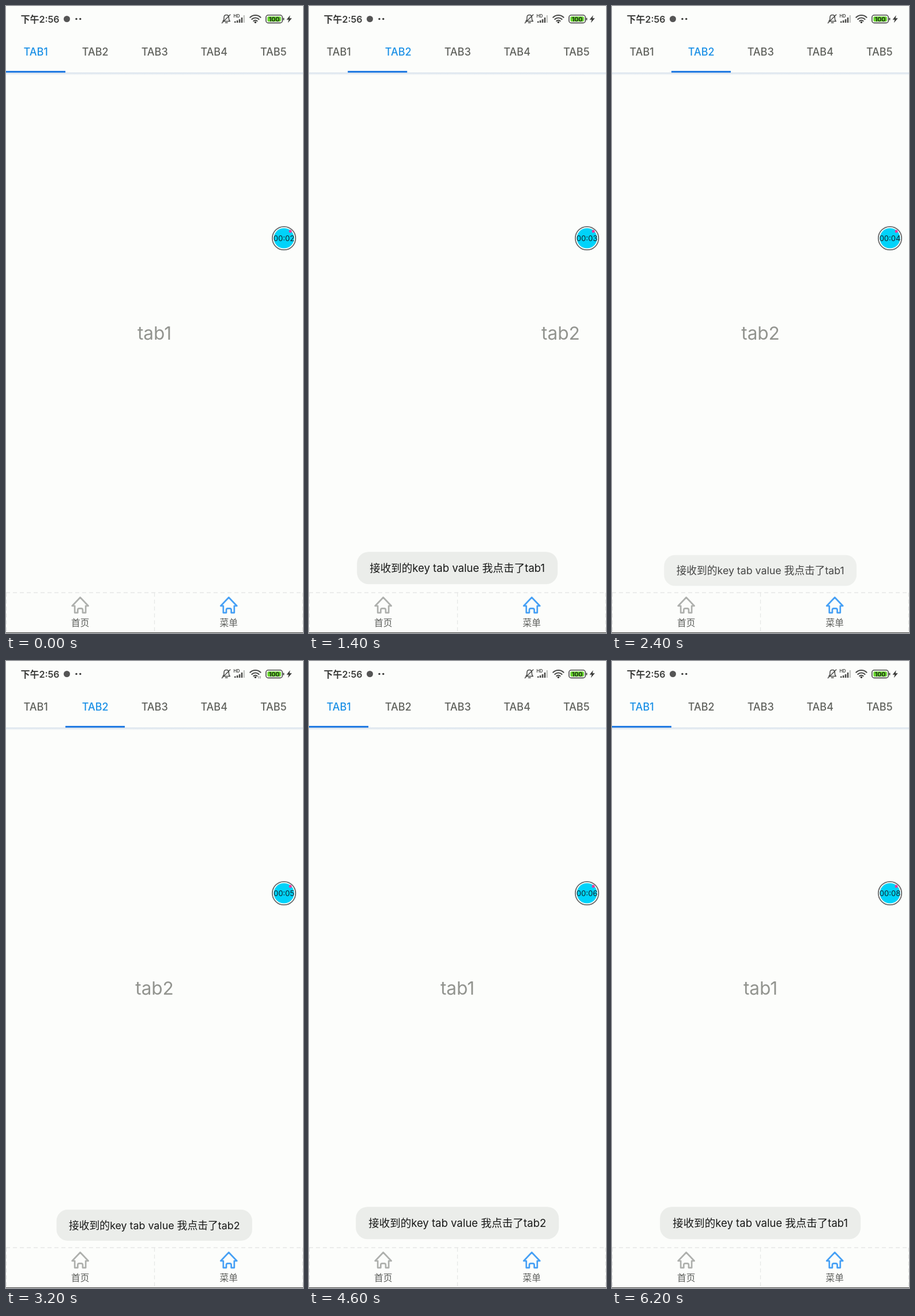
An HTML page for the animation above (6.3 s loop, 515 px wide and 1088 px high).

```html
<!DOCTYPE html>
<html lang="zh">
<head>
<meta charset="utf-8">
<title>Tabs</title>
<style>
  html, body { margin: 0; width: 100%; height: 100%; overflow: hidden; background: #fcfdfb; }
  svg { display: block; width: 100vw; height: 100vh; }
  text { font-family: Inter, "Noto Sans CJK SC", "Noto Sans CJK", sans-serif; white-space: pre; }
  .mid { text-anchor: middle; }
  .line { fill: none; stroke-linecap: round; stroke-linejoin: round; }
</style>
</head>
<body>
<svg viewBox="0 0 515 1088" preserveAspectRatio="none">
  <defs>
    <linearGradient id="shade" x1="0" y1="0" x2="0" y2="1">
      <stop offset="0" stop-color="#d3deea"/>
      <stop offset="1" stop-color="#fcfdfb"/>
    </linearGradient>
    <path id="house" class="line" stroke-width="2.7" d="M-9.5 1041H-14L0 1026.2L14 1041H9.5V1052.8H4.3V1048q0-2.6-2.6-2.6h-3.4q-2.6 0-2.6 2.6V1052.8H-9.5Z"/>
  </defs>
  <rect width="515" height="1088" fill="#fcfdfb"/>

  <!-- status bar -->
  <g fill="#3a3b39">
    <text x="25.5" y="28.5" font-size="16" font-weight="600">下午2:56</text>
    <circle cx="105.5" cy="22.5" r="5.5" fill="#555"/>
    <circle cx="122" cy="22.5" r="1.7"/>
    <circle cx="128.8" cy="22.5" r="1.7"/>
    <path class="line" stroke="#4a4b49" stroke-width="1.5" d="M376 26.5q2-2 2-4.5v-2q0-4.500 4.200-4.500t4.200 4.500v2q0 2.500 2 4.500ZM380.500 29h3.500M374.500 29.500L388.800 15"/>
    <text x="394.5" y="19.800" font-size="7.500" font-weight="600">HD</text>
    <g id="bars"></g>
    <g class="line" stroke="#4a4b49" stroke-width="2.200">
      <path d="M423.300 19.700a13 13 0 0 1 18.200 0M426.300 23a8.700 8.700 0 0 1 12.200 0M429.300 26a4.500 4.500 0 0 1 6.200 0"/>
    </g>
    <circle cx="432.400" cy="28.300" r="1.700"/>
    <path id="traffic" class="line" stroke="#777" stroke-width="1" d="M438.200 30v-3.500M441 26.500v3.500"/>
    <rect x="450.800" y="15.800" width="28.400" height="13.600" rx="4" fill="none" stroke="#4a4b49" stroke-width="1.600"/>
    <rect x="453.300" y="18.300" width="23.400" height="8.600" rx="2" fill="#66d52c"/>
    <rect x="480.500" y="20.500" width="1.800" height="4.200" rx=".8"/>
    <text class="mid" x="465" y="26.500" font-size="10.500" font-weight="700" fill="#20301a">100</text>
    <path d="M492.700 16L486.500 23.700H490.300L488.800 29.200L495.700 21.300H491.600Z"/>
  </g>

  <!-- tab strip -->
  <rect y="115.500" width="515" height="4.500" fill="url(#shade)"/>
  <g id="tabs" class="mid" font-size="18" font-weight="500"></g>
  <rect id="marker" y="112.700" width="103" height="2.800" fill="#0d6fe0"/>

  <!-- pages -->
  <g id="pages" class="mid" font-size="31.500" fill="#92948f">
    <text x="257.500" y="579">tab1</text>
    <text x="772.500" y="579">tab2</text>
  </g>

  <!-- recorder bubble -->
  <circle cx="482" cy="403" r="20.200" fill="#fff" stroke="#686a6a" stroke-width="1.800"/>
  <circle cx="482" cy="403" r="17.600" fill="#00d3fa"/>
  <circle cx="493" cy="391" r="2.500" fill="#e63b9b"/>
  <text id="clock" class="mid" x="482" y="407.800" font-size="13" fill="#10252b"></text>

  <!-- bottom bar -->
  <path d="M0 1018H515M.5 1018V1087M257.500 1018V1087M514.500 1018V1087" fill="none" stroke="#e6e7e6" stroke-width="1.300" stroke-dasharray="7 5"/>
  <use href="#house" x="128.700" stroke="#aeb0ad"/>
  <use href="#house" x="386.300" stroke="#46a0f5"/>
  <g class="mid" font-size="15.700" fill="#5d5f5c">
    <text x="128.700" y="1076">首页</text>
    <text x="386.300" y="1076">菜单</text>
  </g>
  <rect y="1087" width="515" height="1" fill="#3c3d3c"/>

  <g id="toast">
    <rect id="pill" y="-28" height="56" rx="20" fill="#ebedea"/>
    <text id="message" class="mid" y="6.800" font-size="18.500" fill="#161716"></text>
  </g>
</svg>
<script>
  const LOOP = 6300;
  const PAGE = 515, TAB = 103;
  const $ = id => document.getElementById(id);
  const clamp = v => Math.max(0, Math.min(1, v));
  const between = (t, a, b) => t >= a && t < b;

  const toasts = [
    { tab: 1, width: 348, start: 400, end: 2350 },
    { tab: 2, width: 352, start: 3000, end: 4980 },
    { tab: 1, width: 348, start: 5650, end: LOOP }
  ];
  const ENTER = 350, LEAVE = 250;

  function add(parent, tag, attrs, label = '') {
    const el = document.createElementNS('http://www.w3.org/2000/svg', tag);
    for (const key in attrs) el.setAttribute(key, attrs[key]);
    el.textContent = label;
    return parent.appendChild(el);
  }

  const tabs = [0, 1, 2, 3, 4].map(i =>
    add($('tabs'), 'text', { x: 51.7 + i * TAB, y: 86.3 }, 'TAB' + (i + 1)));

  for (let i = 0; i < 5; i++) {
    const h = [2.5, 4, 6, 9, 13][i];
    add($('bars'), 'rect', {
      x: 396 + i * 3.9, y: 29 - h, width: 2.5, height: h, fill: i < 4 ? '#4a4b49' : '#c4c6c3'
    });
  }

  function ease(t, from, to) {
    const p = clamp((t - from) / (to - from));
    return p < 0.5 ? 4 * p ** 3 : 1 - (2 - 2 * p) ** 3 / 2;
  }

  function drawToast(t) {
    const toast = toasts.find(o => between(t, o.start, o.end + LEAVE));
    $('toast').setAttribute('visibility', toast ? 'visible' : 'hidden');
    if (!toast) return;
    const enter = clamp((t - toast.start) / ENTER);
    const leave = clamp((t - toast.end) / LEAVE);
    const rest = Math.max((1 - enter) ** 2, leave);
    const alpha = Math.min(clamp(enter * 2), 1 - leave);
    $('toast').setAttribute('transform',
      `translate(257.200 ${975.2 + 21 * rest}) scale(${1 - 0.2 * rest})`);
    $('toast').setAttribute('opacity', alpha);
    $('pill').setAttribute('x', -toast.width / 2);
    $('pill').setAttribute('width', toast.width);
    $('message').textContent = '接收到的key tab value 我点击了tab' + toast.tab;
  }

  function draw(t) {
    const page = ease(t, 1050, 1680) - ease(t, 4150, 4600);
    $('pages').setAttribute('transform', `translate(${-page * PAGE} 0)`);
    $('marker').setAttribute('x', page * TAB);
    tabs.forEach((el, i) =>
      el.setAttribute('fill', i === Math.round(page) ? '#1b90e6' : '#60625d'));

    $('clock').textContent = '00:0' + (2 + Math.floor((t + 100) / 1000));
    const busy = between(t, 400, 1000) || between(t, 2900, 3500);
    $('traffic').setAttribute('visibility', busy ? 'visible' : 'hidden');
    drawToast(t);
  }

  const began = performance.now();
  function tick() {
    draw((performance.now() - began) % LOOP);
    requestAnimationFrame(tick);
  }
  tick();
</script>
</body>
</html>
```
